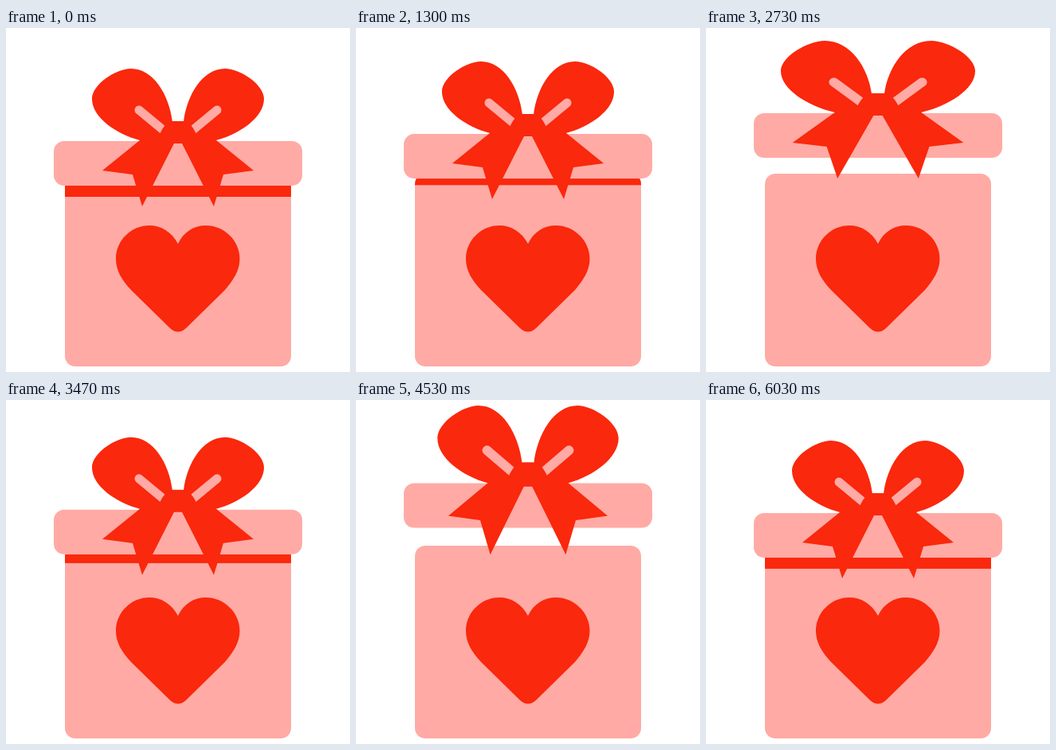
Recreate the animation shown at these times as an HTML page. Size 432x432 px, loop 6.06 s.

```html
<!DOCTYPE html>
<html lang="en">
<head>
<meta charset="utf-8">
<title>Gift box</title>
<style>
  html, body { margin: 0; width: 100%; height: 100%; overflow: hidden; background: #fff; }
  svg { display: block; width: 100vw; height: 100vh; }
  .red { fill: #fa280c; }
  .pink { fill: #ffaaa5; }
  .shine { stroke: #ffaaa5; stroke-width: 11; stroke-linecap: round; }
</style>
</head>
<body>
<svg viewBox="0 0 432 432">
  <defs>
    <rect id="box" x="74" y="183" width="284" height="242" rx="13"/>
    <clipPath id="inBox"><use href="#box"/></clipPath>
    <g id="half">
      <path class="red" d="M209 118C205 84 185 51 157 51C138 51 108 71 108 89C108 112 138 133 168 141
        L121 179L159 184L171 224L211 145L218 131Z"/>
      <path class="shine" d="M167 103L202 132"/>
    </g>
  </defs>
  <use href="#box" class="pink"/>
  <g clip-path="url(#inBox)"><rect id="strip" class="red" x="74" width="284"/></g>
  <path class="red" d="M216 271C208 256 195 248 180 248C157 248 138 267 138 290C138 305 146 317 157 329
    L206 377Q216 386 226 377L275 329C285 317 293.500 305 293.500 290C293.500 267 274 248 251 248C236 248 223 256 216 271Z"/>
  <g id="lid">
    <rect class="pink" x="60" y="142" width="312" height="56" rx="13"/>
    <g id="bow">
      <use href="#half"/>
      <use href="#half" transform="matrix(-1 0 0 1 432 0)"/>
      <path class="red" d="M209 117H223Q232 118 239 133L221 145H211L193 133Q200 118 209 117Z"/>
    </g>
  </g>
</svg>
<script>
const LOOP = 6060, BOUNCE = 2000;
const $ = id => document.getElementById(id);
const strip = $('strip'), lid = $('lid'), bow = $('bow');

const span = (t, a, b) => Math.min(1, Math.max(0, (t - a) / (b - a)));
const smooth = (t, a, b) => { const u = span(t, a, b); return u * u * (3 - 2 * u); };

// Gentle start, long settling: cubic-bezier(.33, 0, .2, 1)
function settle(t, a, b) {
  const x = span(t, a, b);
  let lo = 0, hi = 1;
  for (let i = 0; i < 20; i++) {
    const s = (lo + hi) / 2, r = 1 - s;
    if (3 * r * r * s * .33 + 3 * r * s * s * .2 + s ** 3 < x) lo = s; else hi = s;
  }
  return lo * lo * (3 - 2 * lo);
}

function draw(now) {
  const t = now % LOOP % BOUNCE;
  const lift = 38 * smooth(t, 20, 470) - 3 * smooth(t, 470, 700) - 35 * settle(t, 700, 2000);
  const sx = 1 + .13 * (smooth(t, 400, 700) - settle(t, 730, 1350));
  const sy = 1 + .1 * (smooth(t, 150, 470) - smooth(t, 470, 700));
  lid.setAttribute('transform', `translate(0 ${-lift})`);
  bow.setAttribute('transform', `translate(216 131) scale(${sx} ${sy}) translate(-216 -131)`);
  strip.setAttribute('y', 198 - lift);
  strip.setAttribute('height', Math.max(0, 14 - .65 * lift));
}

const start = performance.now();
function tick() {
  draw(performance.now() - start);
  requestAnimationFrame(tick);
}
tick();
</script>
</body>
</html>
```
